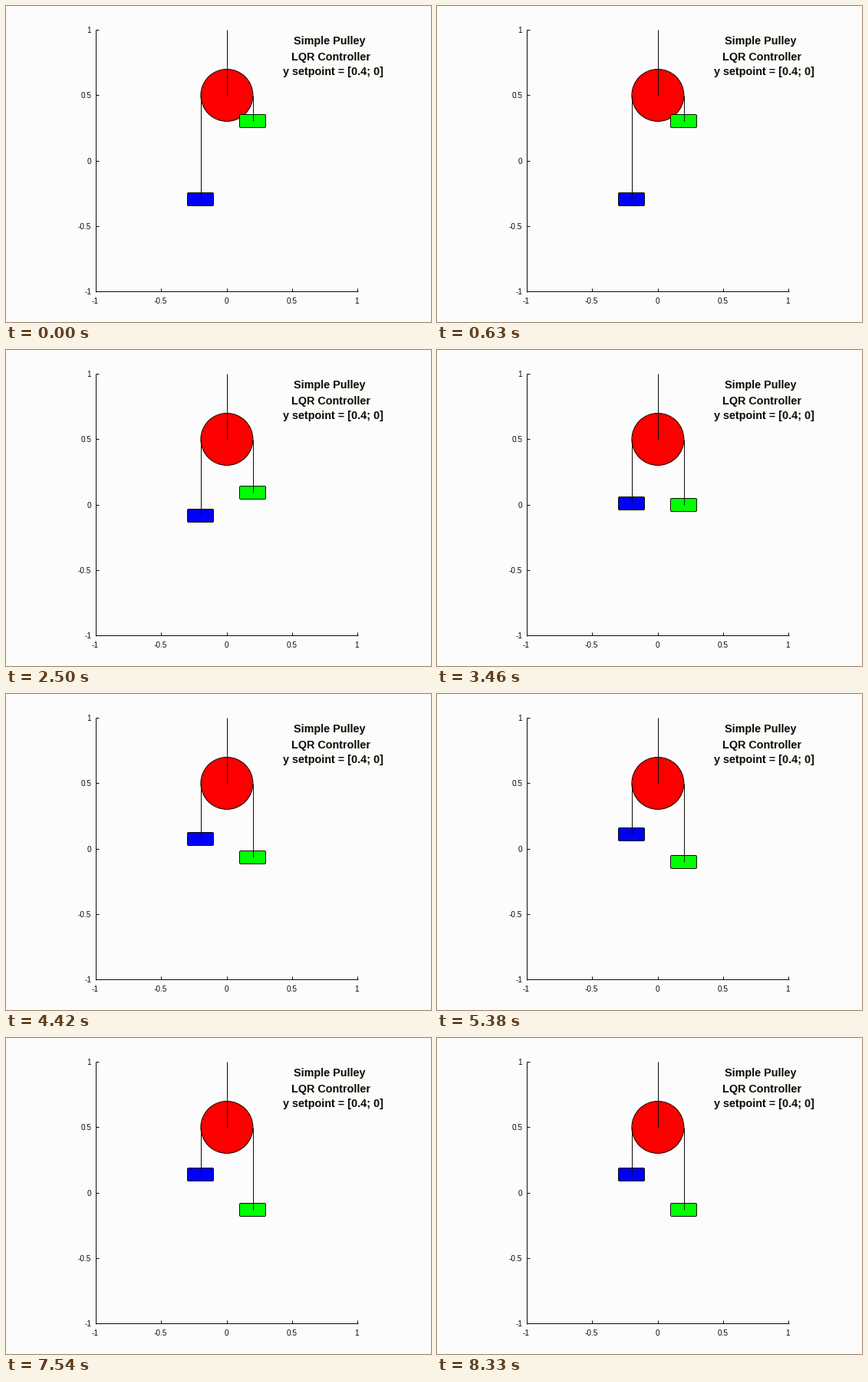
A matplotlib script for the animation above (8.37 s loop, 554 by 412 pixels).

```python
from math import cos, exp, sin

import matplotlib.pyplot as plt
from matplotlib.animation import FuncAnimation
from matplotlib.patches import Circle, FancyBboxPatch

W, H, DPI = 554, 412, 100
PX = 72 / DPI                      # points per pixel
LOOP, STEP = 8370, 30              # ms
INK = "#0c0c00"
SCALE, X0, Y0 = 170.5, 287.5, 201.5
LEFT, BOTTOM = 117, 372
BOX_W, BOX_H = 34, 17

# The display stalls for PAUSE ms at these times and redraws every TICK otherwise
STALLS = (960, 1630, 2880, 3130, 4420, 5080, 5960)
PAUSE, TICK = 290, 60

fig = plt.figure(figsize=(W / DPI, H / DPI), dpi=DPI, facecolor="#fcfcfc")
ax = fig.add_axes([0, 0, 1, 1])
ax.set_xlim(0, W)
ax.set_ylim(H, 0)
ax.axis("off")


def px(x):
    return round(X0 + SCALE * x)


def py(y):
    return round(Y0 - SCALE * y)


def line(xs, ys, z=1):
    return ax.plot(xs, ys, color=INK, lw=PX, zorder=z,
                   solid_capstyle="butt")[0]


def label(x, y, text, size=10, ha="center", weight="normal"):
    ax.text(x, y, text, fontsize=size * PX, family="Liberation Sans",
            weight=weight, ha=ha, va="baseline", color=INK)


def weight_box(x, color):
    box = FancyBboxPatch((x - BOX_W / 2 - 0.5, 0), BOX_W, BOX_H,
                         boxstyle="round,pad=0,rounding_size=1.5",
                         fc=color, ec=INK, lw=PX, zorder=4)
    return ax.add_patch(box)


def travel(t, final=74.5, delay=0.46, decay=0.72, freq=0.3):
    """Damped second-order step response, in pixels after t seconds."""
    t = max(t - delay, 0)
    swing = cos(freq * t) + decay / freq * sin(freq * t)
    return final * (1 - exp(-decay * t) * swing)


def shown_time(ms):
    """Time of the last redraw that is visible at ms."""
    for start in reversed(STALLS):
        if start <= ms < start + PAUSE:
            return start
    return ms // TICK * TICK


# Axes
line([LEFT, LEFT], [31, BOTTOM + 1])
line([LEFT, 459], [BOTTOM, BOTTOM])
for v in (-1, -0.5, 0, 0.5, 1):
    line([LEFT, LEFT + 4], [py(v)] * 2)
    line([px(v)] * 2, [BOTTOM - 4, BOTTOM])
    label(111.3, py(v) + 4, f"{v:g}", ha="right")
    label(px(v) - 0.5, 388, f"{v:g}")

# Titles
for x, y, text in ((421.5, 50, "Simple Pulley"), (424, 71, "LQR Controller"),
                   (426, 90, "y setpoint = [0.4; 0]")):
    label(x, y, text, 14.4, weight="bold")

# Pulley and weights
ax.add_patch(Circle((287.9, 116.4), 34, fc="#ff0000", ec=INK, lw=PX, zorder=2))
line([288, 288], [31, 117], 3)
blue = weight_box(254, "#0000fa")
green = weight_box(322, "#00ff00")
ropes = [line([x, x], [117, 117], 5) for x in (254, 322)]


def update(i):
    d = round(travel(shown_time(i * STEP + STEP / 2) / 1000))
    tops = (243.5 - d, 141.5 + d)
    for box, rope, top in zip((blue, green), ropes, tops):
        box.set_y(top)
        rope.set_ydata([117, top + BOX_H / 2])
    return [blue, green, *ropes]


anim = FuncAnimation(fig, update, frames=LOOP // STEP, interval=STEP,
                     repeat=True, repeat_delay=0)
plt.show()
```
